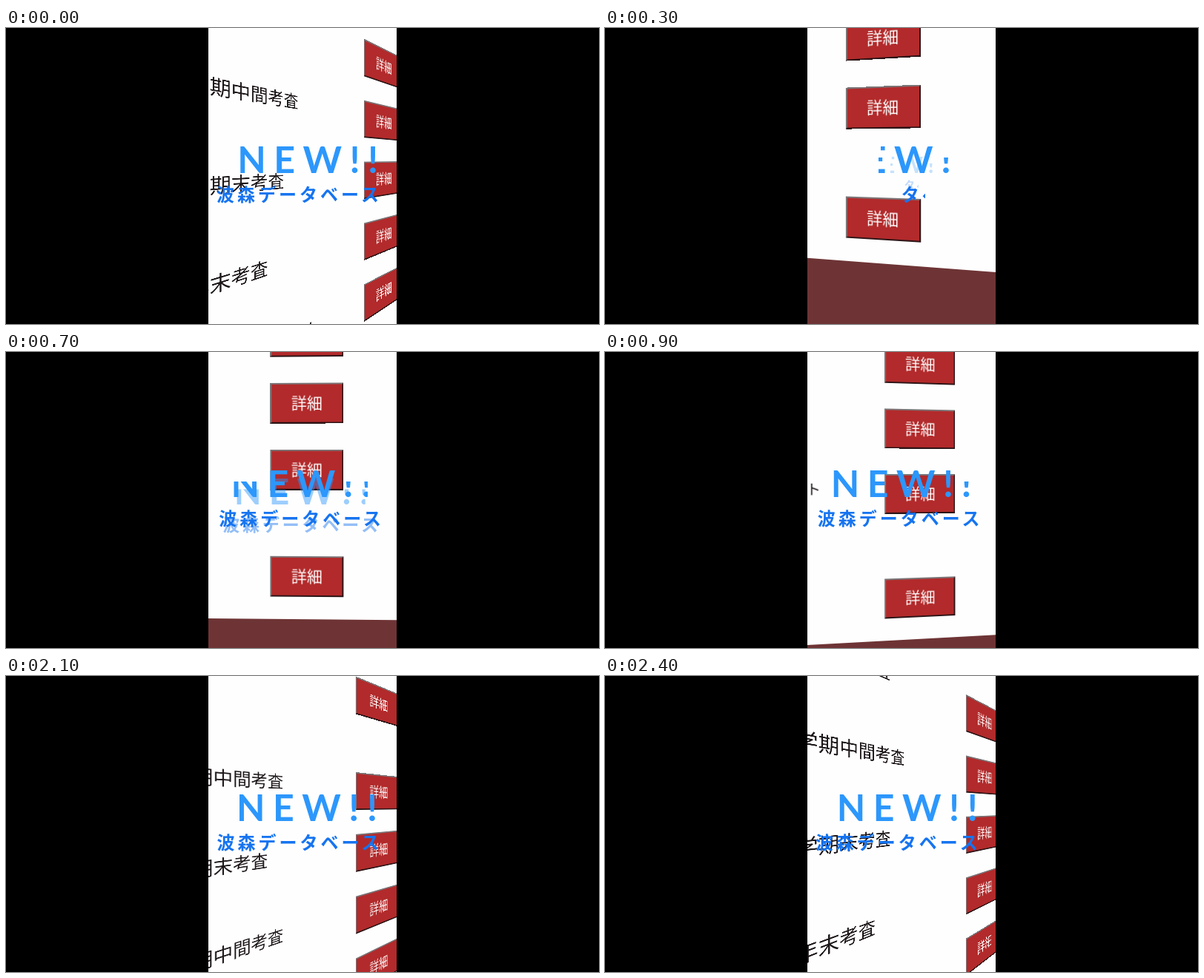
These frames come from a looping animation (800x400 px, 2.5 s). An HTML page:

```html
<!DOCTYPE html>
<html lang="ja">
<head>
<meta charset="utf-8">
<style>
html, body { margin: 0; width: 100%; height: 100%; overflow: hidden; background: #000; }
#phone { position: absolute; left: 273px; top: 0; width: 254px; height: 400px; overflow: hidden; background: #fefefe; }
#page { position: absolute; left: 0; top: 0; transform-origin: 0 0; font-family: "Noto Sans CJK JP", "Noto Sans CJK", sans-serif; }
#page div { position: absolute; box-sizing: border-box; white-space: nowrap; }
.button { left: 0; width: 101px; height: 56px; background: #b22a2b; border: 2.5px solid; border-color: #7b7476 #2c1416 #2c1416 #7b7476;
  color: #fff; font-size: 21.5px; line-height: 50px; text-align: center; }
.label { left: -254px; color: #1c1619; font-size: 19.5px; font-weight: 500; line-height: 28px; }
.footer { left: -300px; top: 59px; width: 700px; height: 500px; background: #6e3435; }
svg { position: absolute; left: 0; top: 0; transform-origin: 0 0; }
.big { font: 700 50px Lato, "Open Sans", sans-serif; letter-spacing: 10.5px; fill: #2c97fc; }
.small { font: 700 24px "Noto Sans CJK JP", "Noto Sans CJK", sans-serif; letter-spacing: 4px; fill: #1674f0; }
</style>
</head>
<body>
<div id="phone"><div id="page"><div class="footer"></div></div></div>
<svg id="title" width="800" height="400"><text class="big" y="196">NEW!!</text><text class="small" y="234">波森データベース</text></svg>
<script>
const page = document.getElementById('page');
const title = document.getElementById('title');
const ghost = title.cloneNode(true);
title.before(ghost);

function add(cls, top, text) {
  const el = document.createElement('div');
  el.className = cls;
  el.style.top = top + 'px';
  el.textContent = text;
  page.append(el);
}

function addRows(names, start) {
  names.forEach((name, i) => {
    const y = start + 92 * i;
    add('label', y - 22, name);
    add('button', y - 28, '詳細');
  });
}

const exams = ['１学期中間考査', '１学期末考査', '２学期中間考査', '２学期末考査', '学年末考査', '第1回実力小テスト'];
addRows(exams.slice(1), -1117);
addRows(exams, -607);
add('button', -28, '詳細');

// The page turns steadily about a vertical axis while it drifts and scrolls
function drawPage(p) {
  const focus = 285;
  const yaw = 2.36 * p - 14.9;
  const zoom = 0.948 + 0.00162 * (p - 10.44) ** 2;
  const u = 107 - 10.4 * p;
  const scroll = p < 15 ? -46 - 16 * p : -976 + 391 * 0.17 ** (p - 19);
  const horizon = 159 + 0.87 * p;
  page.style.transform = `translate(127px, ${horizon}px) perspective(${focus}px)
    translateZ(${focus * (1 - 1 / zoom)}px) rotateY(${yaw}deg) translate(${-u}px, ${-scroll}px)`;
}

// The letters open from the middle: the core at full height, the rest from below
function drawTitle(p) {
  const late = Math.max(0, p - 5), top = 175;
  const left = 410 - 41 * (p - 2), right = 440 + 8 * p;
  const coreL = 372 - 30 * late, coreR = 447 + 11 * late;
  const subL = 400 - 57 * (p - 3), subR = 432 + 24 * (p - 3);
  const shape = [[left, top], [coreL, top], [coreL, 0], [coreR, 0], [coreR, top], [right, top], [right, 205],
    [subR, 205], [subR, 400], [subL, 400], [subL, 205], [left, 205]];
  const clip = `polygon(${shape.map(([x, y]) => `${x}px ${y}px`)})`;
  for (const svg of [ghost, title]) {
    svg.style.clipPath = clip;
    svg.children[0].setAttribute('x', 300 + 0.58 * p);
    svg.children[1].setAttribute('x', 288.5 - 0.21 * p);
  }
  title.style.opacity = p < 3 ? 0 : 1;

  const shrink = 0.4 * 0.47 ** (p - 3);
  ghost.style.transform = `translate(${409 * shrink}px, ${78 * 0.61 ** (p - 3)}px) scale(${1 - shrink})`;
  ghost.style.opacity = p < 3 || p > 8 ? 0 : 0.53 * Math.sin(Math.PI * (p - 2) / 6);
}

// Ten steps a second, with holds at 500 and 1100 ms; the loop opens late in the turn
function pose(t) {
  const tick = Math.floor(t / 100);
  if (tick < 1) return 21;
  if (tick < 7) return Math.min(tick, 5);
  if (tick < 21) return Math.min(tick - 1, 10);
  return tick - 2;
}

let shown;
function frame(now) {
  const p = pose(now % 2500);
  if (p !== shown) {
    shown = p;
    drawPage(p);
    drawTitle(p);
  }
  requestAnimationFrame(frame);
}
frame(performance.now());
</script>
</body>
</html>
```
